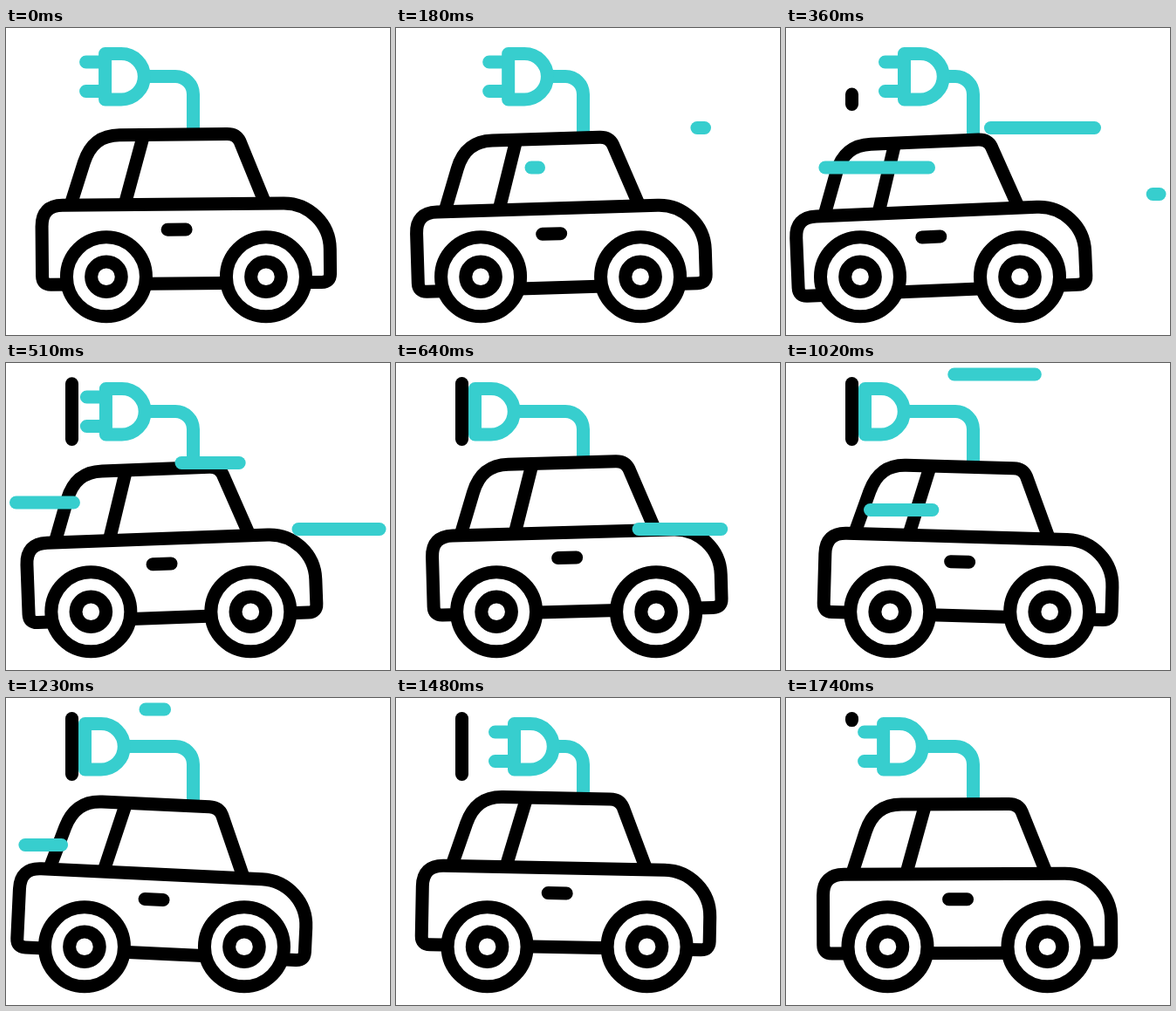
An HTML page for the animation above (1770 ms loop, 440 px wide and 352 px high).

```html
<!DOCTYPE html>
<html lang="en">
<head>
<meta charset="utf-8">
<title>Electric car</title>
<style>
  html, body { margin: 0; width: 100%; height: 100%; overflow: hidden; background: #fff; }
  svg { display: block; width: 440px; height: 352px; }
  .ink, .teal { fill: none; stroke: #000; stroke-width: 15; stroke-linecap: round; stroke-linejoin: round; }
  .teal { stroke: #37cece; }
  .solid { fill: #fff; }
  .flat { stroke-linecap: butt; }
</style>
</head>
<body>
<svg viewBox="0 0 440 352">
  <defs>
    <clipPath id="socket"><rect x="76" y="0" width="364" height="352"/></clipPath>
    <g id="wheel">
      <circle class="ink solid" r="45.5"/>
      <circle class="ink solid" r="17.3"/>
    </g>
  </defs>
  <path id="cable" class="teal flat"/>
  <g clip-path="url(#socket)">
    <g id="plug" class="teal">
      <path d="M91.5 39H113M91.5 72.5H113"/>
      <path d="M113.5 29.5H132A26.25 26.25 0 0 1 132 82H113.5Z"/>
    </g>
  </g>
  <path id="wall" class="ink"/>
  <g id="body" class="ink">
    <path class="solid" d="M75 199L90 153C97 132 110 122 131 122H254Q265 122 269 131L296 199"/>
    <path d="M158 124L137 199"/>
    <path class="solid" d="M65 202H318A53 53 0 0 1 371 255V283Q371 292.8 361 292.8H51Q41 292.8 41 283V226Q41 202 65 202Z"/>
    <path d="M185 231H206"/>
  </g>
  <g id="wheels">
    <use href="#wheel" x="115" y="285.3"/>
    <use href="#wheel" x="298" y="285.3"/>
  </g>
  <g id="wind" class="teal"></g>
</svg>
<script>
const LOOP = 1770;
const el = id => document.getElementById(id);

// Smooth looping curve through [time, value] points, without overshoot.
function track(points) {
  const n = points.length;
  const at = i => {
    const lap = Math.floor(i / n);
    const [t, v] = points[i - lap * n];
    return [t + lap * LOOP, v];
  };
  const secant = i => {
    const [a, b] = [at(i), at(i + 1)];
    return (b[1] - a[1]) / (b[0] - a[0]);
  };
  const slope = i => {
    const [p, q] = [secant(i - 1), secant(i)];
    return p * q > 0 ? 2 * p * q / (p + q) : 0;
  };
  return t => {
    let i = n - 1;
    while (i > 0 && points[i][0] > t) i--;
    const [[t0, a], [t1, b]] = [at(i), at(i + 1)];
    const h = t1 - t0, s = (t - t0) / h, r = 1 - s;
    return a * r * r * (1 + 2 * s) + b * s * s * (3 - 2 * s)
      + h * s * r * (slope(i) * r - slope(i + 1) * s);
  };
}

const ease = (t, from, to) => {
  const s = Math.min(1, Math.max(0, (t - from) / (to - from)));
  return (1 - Math.cos(Math.PI * s)) / 2;
};

const carX = track([[0, 0], [360, -30], [640, 0], [830, 25], [1230, -25], [1290, -27], [1480, -10.5], [1680, 2], [1740, 1.5]]);
const carY = track([[0, 0], [360, 8], [640, -8], [830, -6.5], [1230, .5], [1480, -7], [1740, -.3]]);
const tilt = track([[0, -.5], [360, -2.4], [640, -1.6], [830, 0], [1230, 2.7], [1480, 1.1], [1740, -.2]]);
const plugX = track([[0, 0], [340, 22], [420, 22], [610, -23], [1260, -23], [1470, 22], [1510, 22], [1750, -2]]);

// y, start x, end x, head start/end, tail start/end
const gusts = [
  [114.5, 353.5, 201, 130, 465, 370, 630],
  [160, 163.5, 11.5, 130, 465, 370, 630],
  [190.5, 428, 277, 310, 660, 540, 784],
  [168.5, 171.5, 14.5, 749, 1309, 982, 1382],
  [13, 312.5, 160, 716, 1156, 899, 1339]
].map(spec => {
  const path = document.createElementNS("http://www.w3.org/2000/svg", "path");
  el("wind").append(path);
  return { path, spec };
});

function setLine(path, d, shown) {
  path.setAttribute("d", d);
  path.style.display = shown ? "" : "none";
}

function draw(t) {
  const x = carX(t), dx = plugX(t);
  el("body").setAttribute("transform", `translate(${x} ${carY(t)}) rotate(${tilt(t)} 206.5 212)`);
  el("wheels").setAttribute("transform", `translate(${x} 0)`);
  el("plug").setAttribute("transform", `translate(${dx} 0)`);
  el("cable").setAttribute("d", `M${158 + dx} 55.5H194A20.5 20.5 0 0 1 214.5 76V128`);

  const top = ease(t, 300, 520), bottom = ease(t, 1520, LOOP);
  setLine(el("wall"), `M75.5 ${87.5 - 64 * bottom}V${87.5 - 64 * top}`, top > bottom);

  for (const { path, spec: [y, x0, x1, h0, h1, t0, t1] } of gusts) {
    const head = ease(t, h0, h1), tail = ease(t, t0, t1);
    const pos = s => x0 + (x1 - x0) * s;
    setLine(path, `M${pos(tail)} ${y}H${pos(head)}`, head > tail);
  }
}

const start = performance.now();
function tick() {
  draw((performance.now() - start) % LOOP);
  requestAnimationFrame(tick);
}
tick();
</script>
</body>
</html>
```
